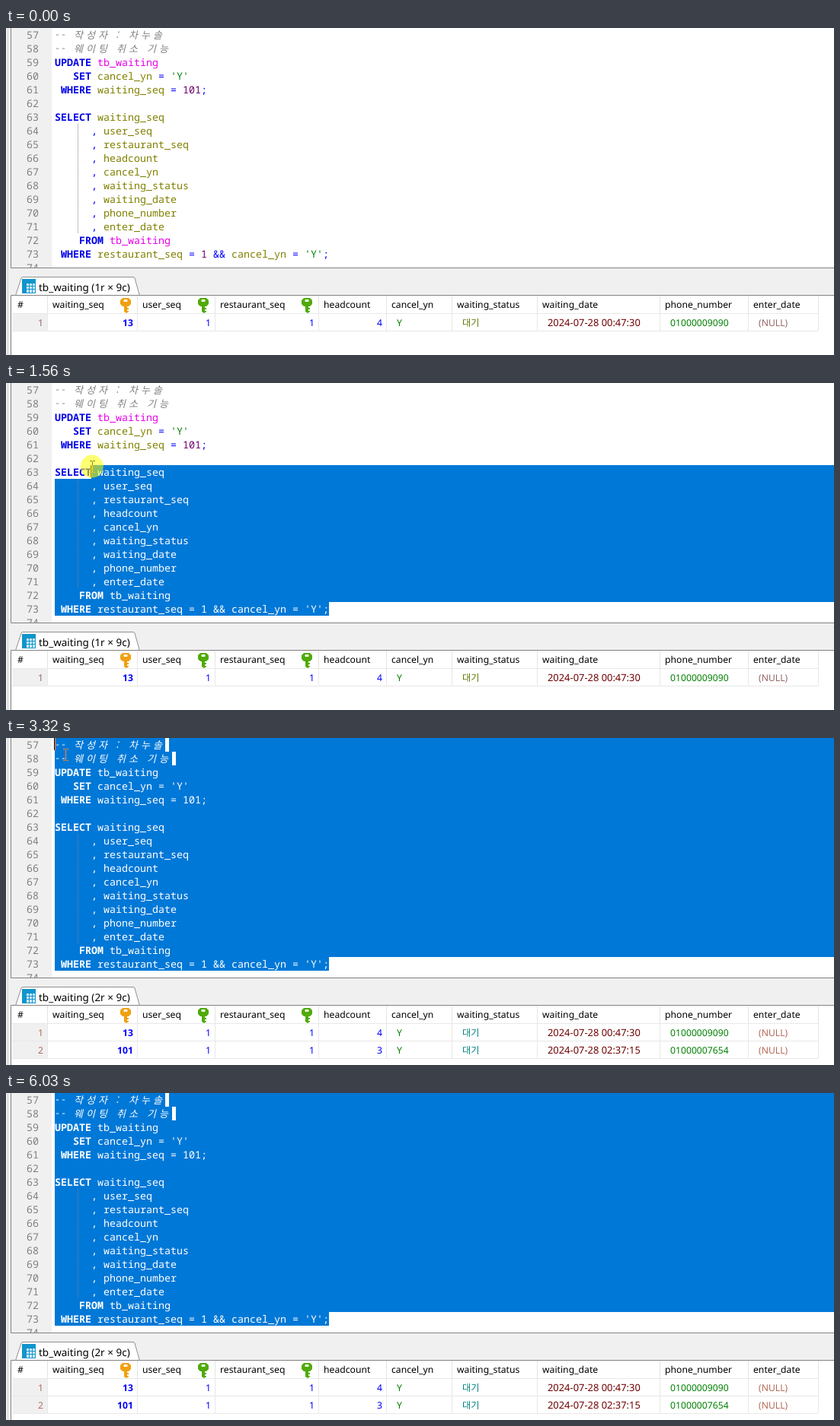
An HTML page that plays this animation: 1087 by 430 pixels, repeating every 6590 ms.

```html
<!DOCTYPE html>
<html lang="ko">
<head>
<meta charset="utf-8">
<title>SQL editor</title>
<style>
html, body { margin: 0; width: 100%; height: 100%; overflow: hidden; background: #fff; }
svg { display: block; width: 1087px; height: 430px; isolation: isolate; }
text { white-space: pre; text-rendering: geometricPrecision; }
.code { font: 13.333px "Noto Sans Mono", monospace; }
.note { font: italic 13px "Noto Sans CJK KR", "Noto Sans CJK", sans-serif; fill: #808080; }
.ui { font: 12.2px "Noto Sans", sans-serif; }
.key { font-weight: 700; fill: #0000e6; }
.table { fill: #e800e8; }
.name { fill: #808000; }
.text { fill: #008000; }
.num { fill: #700070; }
.op { fill: #0000ff; }
.white :is(text, tspan) { fill: #fff; }
.invert { mix-blend-mode: difference; }
</style>
</head>
<body>
<svg viewBox="0 0 1087 430">
  <defs>
    <clipPath id="pane"><rect width="1087" height="315"/></clipPath>
    <clipPath id="selClip"><path id="selShape"/></clipPath>
  </defs>
  <rect width="1087" height="430" fill="#fff"/>
  <rect width="60" height="316" fill="#f0f0f0"/>
  <rect y="316" width="1087" height="35" fill="#f0f0f0"/>
  <rect y="316" width="6" height="114" fill="#f0f0f0"/>
  <path d="M2.5 0V430" stroke="#d0d0d0"/>
  <g clip-path="url(#pane)">
    <g id="numbers" class="code" fill="#808080" text-anchor="end"></g>
    <g id="code"></g>
    <path id="sel" fill="#0078d7"/>
    <g clip-path="url(#selClip)"><g id="whiteCode" class="white"></g></g>
    <rect id="tail57" x="209" y="0" width="5" height="18" fill="#fff"/>
    <rect id="tail58" x="218" y="18" width="5" height="18" fill="#fff"/>
    <path d="M94.5 126V270" stroke="#808080" stroke-dasharray="1 1"/>
  </g>
  <path d="M6.5 0V315.5H1087M6.5 430V351.5H1087" fill="none" stroke="#828282"/>
  <path d="M12.5 352L20 329Q20.500 327.500 22 327.500H167Q168.500 327.500 169 329L175.500 352" fill="#fff" stroke="#909090"/>
  <path d="M13 351.500H175" stroke="#828282"/>
  <rect x="21" y="330" width="18" height="19" fill="#1095cc"/>
  <path d="M27 336h3v3h-3zM31 336h3v3h-3zM35 336h3v3h-3zM27 340h3v3h-3zM31 340h3v3h-3zM35 340h3v3h-3zM27 344h3v4h-3zM31 344h3v4h-3zM35 344h3v4h-3z" fill="#d4eef9"/>
  <g id="header" class="ui"></g>
  <g id="before" class="ui"></g>
  <g id="after" class="ui"></g>
  <rect id="caret" class="invert" width="2" height="16" fill="#fff"/>
  <path id="beam" class="invert" fill="none" stroke="#fff"
    d="M-3.500-7.500h3M.500-7.500h3M0-7V7M-3.500 7.500h3M.500 7.500h3"/>
  <path id="arrow" d="M.5.5V17l4-4 3 6 2-1-3-6h5z" fill="#fff" stroke="#000"/>
  <circle id="halo" r="15" fill="#ffff00" fill-opacity=".55"/>
  <circle id="ring" r="13" fill="none" stroke="#e89a30" stroke-width="2" stroke-dasharray="30 11"/>
</svg>
<script>
const LOOP = 6590, LEFT = 64, CHAR = 8, ROW = 18, FIRST = 57, LAST = 73;
const $ = id => document.getElementById(id);

const lines = [
  "-- 작성자 : 차누솔", "-- 웨이팅 취소 기능",
  "UPDATE tb_waiting", "   SET cancel_yn = 'Y'", " WHERE waiting_seq = 101;", "",
  "SELECT waiting_seq",
  ...["user_seq", "restaurant_seq", "headcount", "cancel_yn", "waiting_status",
    "waiting_date", "phone_number", "enter_date"].map(name => "      , " + name),
  "    FROM tb_waiting", " WHERE restaurant_seq = 1 && cancel_yn = 'Y';"
];

const kinds = [[/^'/, "text"], [/^[A-Z]/, "key"], [/^tb_/, "table"],
  [/^[a-z]/, "name"], [/^\d/, "num"], [/./, "op"]];
const escapeXml = s => s.replace(/&/g, "&amp;");

function codeLine(line, i) {
  const y = i * ROW + 14;
  if (line.startsWith("--")) {
    // Korean letters take two cells, everything else one.
    let x = LEFT, out = "";
    for (const ch of line) {
      const wide = ch > "\u1000";
      if (ch !== " ") out += `<text class="note" x="${x + (wide ? 1 : 0)}" y="${y}">${ch}</text>`;
      x += wide ? 2 * CHAR : CHAR;
    }
    return out;
  }
  const spans = line.replace(/'[^']*'|\w+|[^\w\s']+/g, token =>
    `<tspan class="${kinds.find(([test]) => test.test(token))[1]}">${escapeXml(token)}</tspan>`);
  return `<text class="code" x="${LEFT}" y="${y}">${spans}</text>`;
}

$("code").innerHTML = $("whiteCode").innerHTML = lines.map(codeLine).join("");
$("numbers").innerHTML = Array.from({ length: 18 }, (_, i) =>
  `<text x="43" y="${i * ROW + 14}">${FIRST + i}</text>`).join("");

const label = (x, y, s, attrs = "") => `<text x="${x}" y="${y}" ${attrs}>${s}</text>`;
const keyIcon = (x, color) => `<g transform="translate(${x} 361)" fill="${color}">
  <path d="M-4-6H4L7-3V2L4 5H2V7H4V9H2V11H4V12L1 14L-2 12V5H-4L-7 2V-3Z"/>
  <rect x="-2.500" y="-4" width="5" height="3" rx="1" fill="#fff"/></g>`;

const columns = [["#", 15], ["waiting_seq", 61], ["user_seq", 179], ["restaurant_seq", 281],
  ["headcount", 417], ["cancel_yn", 506], ["waiting_status", 592], ["waiting_date", 704],
  ["phone_number", 865], ["enter_date", 981]];
const edges = [54, 172, 274, 410, 499, 585, 697, 858, 974, 1066];

$("header").innerHTML = columns.map(([name, x]) => label(x, 368, name)).join("") +
  keyIcon(157, "#f0a010") + keyIcon(259, "#50aa08") + keyIcon(395, "#50aa08") +
  edges.map(x => `<path d="M${x}.500 352V375" stroke="#e4e4e4"/>`).join("");

function results(rows, statusColor, nullColor) {
  const title = label(43, 346, `tb_waiting (${rows.length}r × 9c)`, 'style="font-size:13.500px"');
  return title + rows.map(([seq, heads, date, phone], i) => {
    const top = 375 + i * 23, y = top + 17;
    const right = (x, s, attrs) => label(x, y, s, `text-anchor="end" ${attrs}`);
    const blue = 'fill="#0000ff"';
    return `<rect x="8" y="${top}" width="46" height="23" fill="#f0f0f0"/>
      <path d="M8 ${top}.500H1066M8 ${top + 23}.500H1066" stroke="#e8e8e8"/>` +
      edges.map(x => `<path d="M${x}.500 ${top}v23" stroke="#e8e8e8"/>`).join("") +
      right(49, i + 1, `fill="${nullColor}"`) +
      right(167, seq, blue + ' font-weight="700"') +
      right(269, 1, blue) + right(405, 1, blue) + right(494, heads, blue) +
      label(513, y, "Y", 'fill="#008000"') +
      label(599, y, "대기", `fill="${statusColor}" style="font-family:'Noto Sans CJK KR','Noto Sans CJK',sans-serif"`) +
      label(711, y, date, 'fill="#700000" style="font-size:12.900px"') +
      label(872, y, phone, 'fill="#008000"') +
      label(988, y, "(NULL)", `fill="${nullColor}"`);
  }).join("");
}

const oldRow = [13, 4, "2024-07-28 00:47:30", "01000009090"];
const newRow = [101, 3, "2024-07-28 02:37:15", "01000007654"];
$("before").innerHTML = results([oldRow], "#5c7800", "#946868");
$("after").innerHTML = results([oldRow, newRow], "#008080", "#b56a58");

// Pointer path: time, x, y
const path = [
  [220, 963, 407], [480, 700, 305], [600, 540, 269], [730, 451, 300], [990, 451, 300],
  [1120, 375, 292], [1150, 366, 288], [1320, 208, 219], [1350, 197, 207],
  [1530, 114, 118], [1560, 113, 110], [1620, 104, 87], [2100, 61, 11],
  [2390, 62, 12], [2420, 78, 22], [3950, 78, 22], [4390, 957, 271], [4570, 1055, 404]
];

function pointerAt(t) {
  const i = path.findIndex(p => p[0] > t);
  if (i < 1) return path[i < 0 ? path.length - 1 : 0].slice(1);
  const [a, b] = [path[i - 1], path[i]];
  const k = (t - a[0]) / (b[0] - a[0]);
  return [1, 2].map(n => a[n] + (b[n] - a[n]) * k);
}

// The selection trails the pointer slightly.
function selectionAt(t) {
  const [x, y] = pointerAt(Math.min(t - 30, 2100));
  const row = Math.max(0, Math.min(LAST - FIRST, Math.floor(y / ROW)));
  const col = Math.max(0, Math.min(lines[row].length, Math.round((x - LEFT) / CHAR)));
  return { row, x: LEFT + col * CHAR };
}

function selectionShape({ row, x }) {
  const last = LAST - FIRST, top = row * ROW, bottom = last * ROW;
  const end = LEFT + lines[last].length * CHAR;
  if (row === last) return `M${x} ${top}H${end}v${ROW}H${x}Z`;
  return `M${x} ${top}H1087V${bottom}H${end}v${ROW}H${LEFT}V${top + ROW}H${x}Z`;
}

function caretOn(t) {
  if (t < 990) return false;
  if (t < 2680) return true;
  if (t < 3220) return false;
  return t < 3410 || Math.floor((t - 3410) / 524) % 2 === 0;
}

const show = (id, on) => { $(id).style.display = on ? "" : "none"; };
const place = (id, x, y) => $(id).setAttribute("transform", `translate(${x} ${y})`);

function render(t) {
  const [px, py] = pointerAt(t);
  const visible = t >= 220 && t < 4570, overGrid = py > 316;
  show("beam", visible && !overGrid);
  show("arrow", visible && overGrid);
  place("beam", Math.round(px) + .5, Math.round(py));
  place("arrow", Math.round(px), Math.round(py));
  place("halo", px, py);
  place("ring", px, py);
  show("halo", t >= 990 && t < 2290);
  show("ring", t >= 2130 && t < 2290);

  const start = selectionAt(t), selecting = t >= 990;
  const shape = selecting ? selectionShape(start) : "M0 0";
  $("sel").setAttribute("d", shape);
  $("selShape").setAttribute("d", shape);
  show("tail57", selecting && start.row === 0);
  show("tail58", selecting && start.row <= 1);
  show("caret", caretOn(t));
  place("caret", start.x - 1, start.row * ROW);

  show("before", t < 3320);
  show("after", t >= 3320);
}

const began = performance.now();
function tick() {
  render((performance.now() - began) % LOOP);
  requestAnimationFrame(tick);
}
tick();
</script>
</body>
</html>
```
